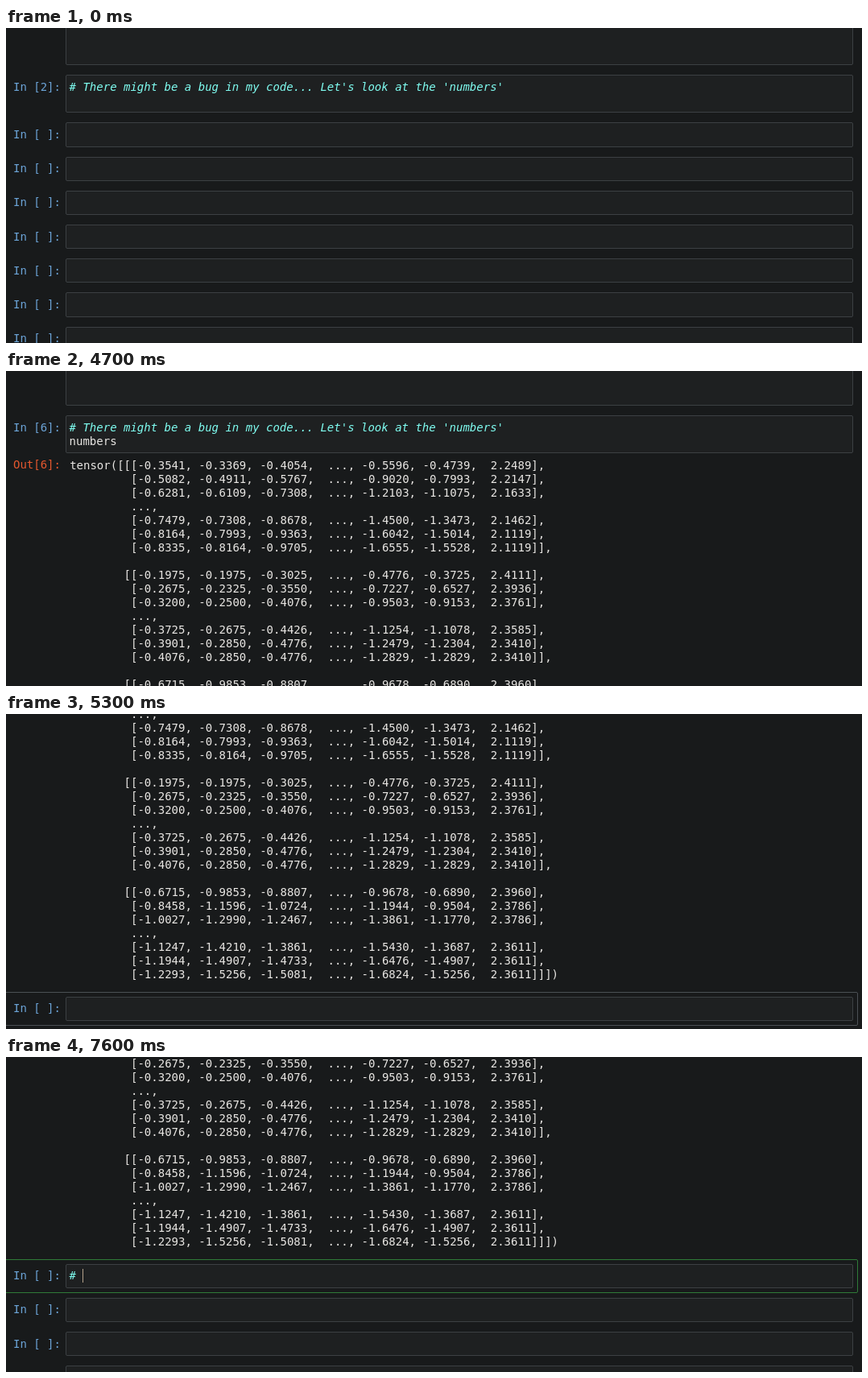
Recreate the animation shown at these times as an HTML page. Size 1063 by 391 pixels, loop 8000 ms.

```html
<!DOCTYPE html>
<html lang="en">
<head>
<meta charset="utf-8">
<title>Notebook</title>
<style>
  html, body { margin: 0; width: 100%; height: 100%; overflow: hidden; background: #181a1b; }
  #stage { position: relative; width: 1063px; height: 391px; overflow: hidden; }
  #page { position: absolute; left: 0; top: 0; width: 100%; }
  #page div { position: absolute; box-sizing: border-box; }
  .text { font: 14px/17px "DejaVu Sans Mono", monospace; white-space: pre; color: #e8e6e3; }
  .text.prompt { left: 8.97px; color: #6ba3d6; }
  .text.out { color: #e4572e; }
  .text.code { left: 78.57px; }
  .text.result { left: 79.17px; }
  .text.comment { color: #7ffcf0; font-style: italic; }
  .box { left: 74px; width: 978px; background: #1e2021; border: 1px solid #3c4043; border-radius: 2px; }
  .ring { left: -10px; width: 1068px; border: 1px solid #4b5054; border-radius: 2px; }
  .ring.edit { border-color: #2f7a38; }
  .caret { width: 1px; height: 17px; background: #b3a08a; }
</style>
</head>
<body>
<div id="stage"><div id="page"></div></div>
<script>
const LOOP = 8000;
const RUN = 3300;
const STEP = 100;
const CODE_X = 78.57;
const CHAR = 8.43;
const CELL_STEP = 42.2;
const BLINK = 500;

// Scroll offset at a few steps after its start; a smooth curve joins them.
const SCROLL_START = 4600;
const scrollKeys = [[0, 0], [1, 3], [5, 102], [10, 251], [11, 265]];

// Image channels: normalisation, and the pixels of the first and last row.
const channels = [
  { mean: 0.485, std: 0.229, first: [103, 104, 100, 91, 96, 255], last: [75, 76, 67, 27, 33, 247] },
  { mean: 0.456, std: 0.224, first: [105, 105, 99, 89, 95, 254], last: [93, 100, 89, 43, 43, 250] },
  { mean: 0.406, std: 0.225, first: [65, 47, 53, 48, 64, 241], last: [33, 16, 17, 7, 16, 239] }
];

function formatRow({ mean, std, first, last }, row) {
  const mix = Math.sin(row / 5 * Math.PI / 2);
  const cells = first.map((a, i) => {
    const pixel = Math.round(a + (last[i] - a) * mix);
    return ((pixel / 255 - mean) / std).toFixed(4).padStart(7);
  });
  cells.splice(3, 0, " ...");
  return "[" + cells.join(", ") + "]";
}

function formatChannel(channel) {
  const rows = Array.from({ length: 6 }, (_, i) => formatRow(channel, i));
  rows.splice(3, 0, "...");
  return "[" + rows.join(",\n" + " ".repeat(9)) + "]";
}

const tensorText = "tensor([" + channels.map(formatChannel).join(",\n\n" + " ".repeat(8)) + "])";

const page = document.getElementById("page");

function add(parent, cls, style, text = "") {
  const el = document.createElement("div");
  el.className = cls;
  for (const key in style) el.style[key] = style[key] + "px";
  el.textContent = text;
  parent.append(el);
  return el;
}

const group = () => add(page, "", { left: 0, top: 0 });
const show = (el, on) => { el.style.display = on ? "block" : "none"; };

function addEmptyCells(parent, top, count) {
  for (let i = 0; i < count; i++) {
    const y = top + i * CELL_STEP;
    const boxTop = Math.round(y);
    add(parent, "box", { top: boxTop, height: Math.round(y + 30.2) - boxTop });
    add(parent, "text prompt", { top: Math.round(y + 14.5) - 8 }, "In [ ]:");
  }
}

// A line typed between focus and blur; its caret blinks anew after each key.
function addTypedLine(top, cls, text, { focus, keys, blur }) {
  const line = add(page, "text code " + cls, { top });
  const caret = add(page, "caret", { top });
  return t => {
    const pressed = keys.filter(key => t >= key);
    const last = pressed.length ? pressed[pressed.length - 1] : focus;
    line.textContent = text.slice(0, pressed.length);
    caret.style.left = Math.round(CODE_X + pressed.length * CHAR) + "px";
    show(caret, t >= focus && t < blur && (t - last) % (2 * BLINK) < BLINK);
  };
}

add(page, "box", { top: -40, height: 86 });
const ring = add(page, "ring edit", { top: 52, height: 59 });
add(page, "box", { top: 58, height: 47 });
const prompt = add(page, "text prompt", { top: 65 });
add(page, "text code comment", { top: 65 },
  "# There might be a bug in my code... Let's look at the 'numbers'");

const before = group();
addEmptyCells(before, 117.4, 7);

const after = group();
add(after, "text prompt out", { top: 111 }, "Out[6]:");
add(after, "text result", { top: 112 }, tensorText);
const nextRing = add(after, "ring", { top: 516, height: 42 });
addEmptyCells(after, 521.7, 4);

const codeTiming = { focus: 800, keys: [1600, 1800, 2000, 2100, 2300, 2300, 2600], blur: RUN };
const noteTiming = { focus: 6700, keys: [7500, 7600], blur: LOOP };
const drawCode = addTypedLine(82, "", "numbers", codeTiming);
const drawNote = addTypedLine(528, "comment", "# ", noteTiming);

// Lagrange polynomial through the given points.
function curve(points, x) {
  return points.reduce((sum, [xi, yi]) => sum + points.reduce(
    (term, [xj]) => xj === xi ? term : term * (x - xj) / (xi - xj), yi), 0);
}

function scrollAt(t) {
  const step = Math.floor((t - SCROLL_START) / STEP);
  return Math.round(curve(scrollKeys, Math.min(11, Math.max(0, step))));
}

function draw(t) {
  const done = t >= RUN;
  page.style.top = -scrollAt(t) + "px";
  prompt.textContent = done ? "In [6]:" : "In [2]:";
  show(ring, t >= codeTiming.focus && !done);
  show(before, !done);
  show(after, done);
  nextRing.classList.toggle("edit", t >= noteTiming.focus);
  drawCode(t);
  drawNote(t);
}

const start = performance.now();
function tick() {
  draw((performance.now() - start) % LOOP);
  requestAnimationFrame(tick);
}
tick();
</script>
</body>
</html>
```
